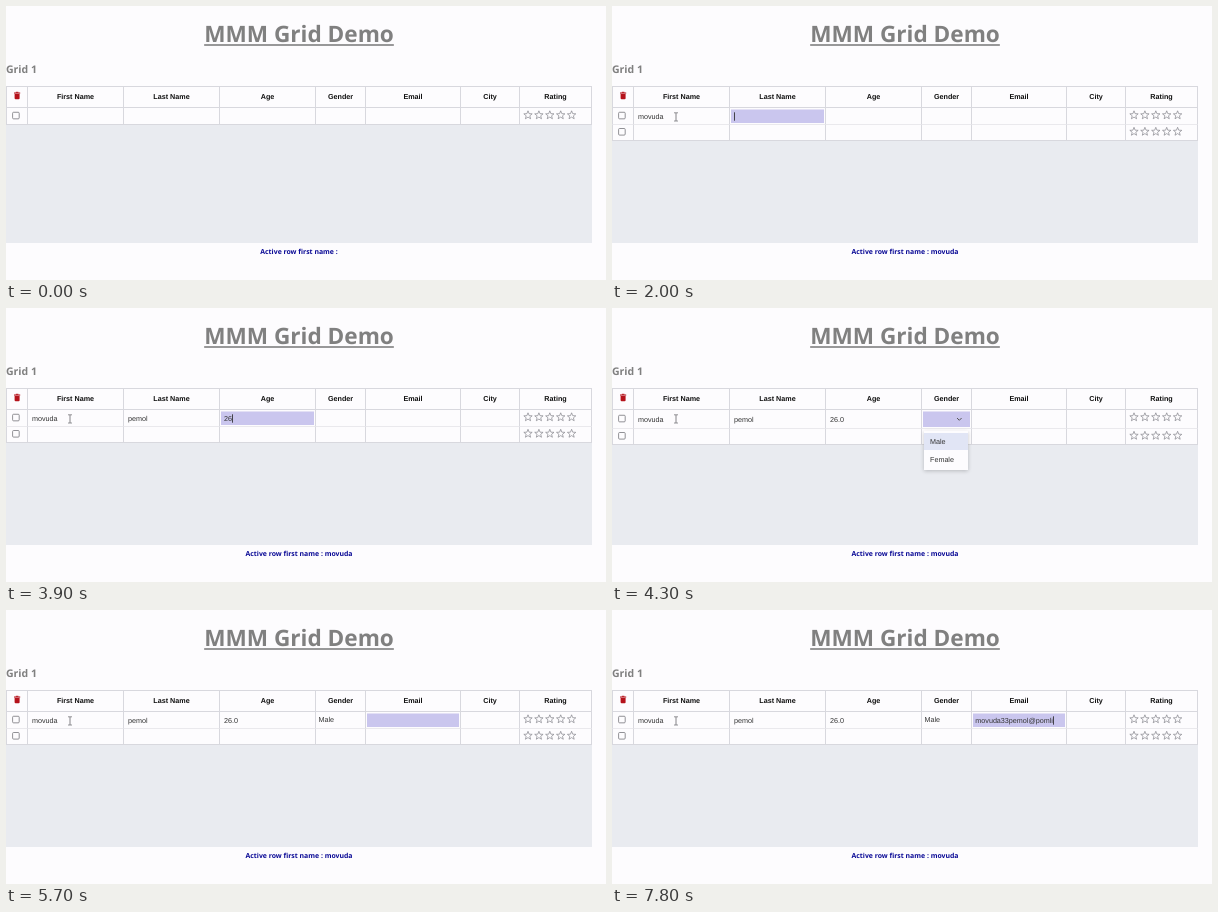
Write an HTML page with a canvas that moves like this. It is 600 px wide and 274 px high and loops after 8000 ms.

```html
<!DOCTYPE html>
<html lang="en">
<head>
<meta charset="utf-8">
<title>Grid Demo</title>
<style>
  html, body { margin: 0; height: 100%; overflow: hidden; background: #fdfcfe; }
  canvas { display: block; width: 600px; height: 274px; }
</style>
</head>
<body>
<canvas id="stage"></canvas>
<script>
const LOOP = 8000;
const SANS = '"Liberation Sans", Arial, sans-serif';
const HUMANIST = '"Open Sans", "Noto Sans", sans-serif';
const FIRST = 'movuda', LAST = 'pemol', EMAIL = 'movuda33pemol@pomli';
const COLUMNS = [0, 21.5, 117.5, 213.5, 309.5, 359.5, 454.5, 513.5, 585.5];
const HEADERS = ['', 'First Name', 'Last Name', 'Age', 'Gender', 'Email', 'City', 'Rating'];

// Each field is edited from start to end; keys holds the time of every keystroke.
const emailKeys = [...Array.from({ length: 13 }, (_, i) => 5800 + i * 100),
  7200, 7300, 7400, 7600, 7700, 7800];
const FIELDS = [
  { col: 1, typed: FIRST, start: 800, caret: 900, end: 1900, keys: [1000, 1300, 1400, 1500, 1600, 1700] },
  { col: 2, typed: LAST, start: 1900, end: 3000, keys: [2200, 2300, 2500, 2600, 2800] },
  { col: 3, typed: '26', final: '26.0', start: 3000, end: 4100, keys: [3200, 3400] },
  { col: 4, typed: 'ma', final: 'Male', start: 4100, end: 5500, keys: [4700, 4800] },
  { col: 5, typed: EMAIL, start: 5500, caret: 5800, end: LOOP, keys: emailKeys }
];
const POINTER_PATH = [[475, 238], [300, 170], [120, 125], [61, 106]];

const canvas = document.getElementById('stage');
const ctx = canvas.getContext('2d');
const scale = window.devicePixelRatio || 1;
canvas.width = 600 * scale;
canvas.height = 274 * scale;

function rect(x, y, w, h, color) {
  ctx.fillStyle = color;
  ctx.fillRect(x, y, w, h);
}

function line(points, color, width = 1) {
  ctx.strokeStyle = color;
  ctx.lineWidth = width;
  ctx.beginPath();
  points.forEach(([x, y]) => ctx.lineTo(x, y));
  ctx.stroke();
}

function text(string, x, y, { font = `7.2px ${SANS}`, color = '#333', align = 'left' } = {}) {
  ctx.font = font;
  ctx.fillStyle = color;
  ctx.textAlign = align;
  ctx.fillText(string, x, y);
  return ctx.measureText(string).width;
}

function star(cx, cy) {
  ctx.beginPath();
  for (let i = 0; i < 10; i++) {
    const angle = -Math.PI / 2 + i * Math.PI / 5;
    const radius = i % 2 ? 1.9 : 4.4;
    ctx.lineTo(cx + radius * Math.cos(angle), cy + radius * Math.sin(angle));
  }
  ctx.closePath();
  ctx.strokeStyle = '#85858b';
  ctx.lineWidth = 0.7;
  ctx.stroke();
}

function row(top, bottom) {
  rect(0, top, 586, bottom - top, '#fdfcfe');
  COLUMNS.forEach(x => line([[x + (x ? 0 : 0.5), top], [x + (x ? 0 : 0.5), bottom]], '#d8d8de'));
  line([[0, bottom], [586, bottom]], '#d8d8de');
}

function dataRow(top, bottom) {
  row(top, bottom);
  const middle = (top + bottom) / 2 - 0.8;
  ctx.strokeStyle = '#77777c';
  ctx.lineWidth = 0.8;
  ctx.beginPath();
  ctx.roundRect(6.6, middle - 3.2, 6.6, 6.6, 1);
  ctx.stroke();
  for (let i = 0; i < 5; i++) star(522 + i * 10.9, top + 7.2);
}

function trash() {
  const red = '#b5121b';
  rect(9.8, 85.8, 2.6, 1, red);
  rect(8, 86.5, 6.2, 1.1, red);
  ctx.beginPath();
  ctx.roundRect(8.6, 88, 5, 5.2, [0, 0, 1, 1]);
  ctx.fill();
}

function header() {
  const gray = '#808080';
  const width = text('MMM Grid Demo', 293, 36.3, { font: `bold 22.6px ${HUMANIST}`, color: gray, align: 'center' });
  rect(293 - width / 2, 38.2, width, 1.6, gray);
  text('Grid 1', 0, 67, { font: `bold 10.5px ${HUMANIST}`, color: gray });
  row(80.5, 101.5);
  line([[0, 80.5], [586, 80.5]], '#d8d8de');
  HEADERS.forEach((label, i) => text(label, (COLUMNS[i] + COLUMNS[i + 1]) / 2, 93.3,
    { font: `bold 7.2px ${SANS}`, color: '#111', align: 'center' }));
  trash();
}

function field(f, t, shift) {
  if (t < f.start) return;
  const left = COLUMNS[f.col];
  const isGender = f.col === 4;
  if (t >= f.end) {
    text(f.final || f.typed, left + (isGender ? 3 : 4.5), (isGender ? 112 : 112.8) + shift);
    return;
  }
  rect(left + 1.5, 103.5, COLUMNS[f.col + 1] - left - 3, isGender ? 15.5 : 13.5, '#cac6ee');
  const typed = isGender && t >= 5200 ? f.final : f.typed.slice(0, f.keys.filter(k => k <= t).length);
  const x = left + (isGender ? 8 : f.col === 5 ? 3.8 : 4.5);
  const width = text(typed, x, isGender ? 113.3 : 112.8);
  if (isGender) line([[345, 110], [347.3, 112.3], [349.6, 110]], '#555', 1);
  else if (t >= (f.caret || f.start)) rect(x + width + 0.2, 106.3, 0.8, 8.4, '#222');
}

function popup(t) {
  if (t < 4100 || t >= 5200) return;
  ctx.save();
  ctx.globalAlpha = Math.min(1, (t - 4000) / 200);
  ctx.shadowColor = 'rgba(0,0,0,.22)';
  ctx.shadowBlur = 4 * scale;
  ctx.shadowOffsetY = scale;
  rect(312, 122.5, 44, 39.5, '#fdfcfe');
  ctx.shadowColor = 'transparent';
  rect(312, 125, 44, 17, '#e1e5f5');
  text('Male', 318, 135.8);
  text('Female', 318, 153.6);
  ctx.restore();
}

function cursor(t) {
  if (t < 200) return;
  if (t >= 800) {
    const gray = '#77777c';
    line([[64, 107], [64, 115]], gray, 0.9);
    line([[62, 106.8], [66, 106.8]], gray, 0.8);
    line([[62, 115], [66, 115]], gray, 0.8);
    return;
  }
  const [x, y] = POINTER_PATH[Math.min(3, Math.floor((t - 200) / 100))];
  ctx.beginPath();
  [[0, 0], [0, 9], [2, 7.2], [3.4, 10.2], [4.7, 9.6], [3.4, 6.7], [6.2, 6.5]]
    .forEach(([dx, dy]) => ctx.lineTo(x + dx, y + dy));
  ctx.closePath();
  ctx.fillStyle = '#fff';
  ctx.fill();
  ctx.strokeStyle = '#333';
  ctx.lineWidth = 0.7;
  ctx.stroke();
}

function draw(t) {
  ctx.setTransform(scale, 0, 0, scale, 0, 0);
  ctx.textRendering = 'geometricPrecision';
  rect(0, 0, 600, 274, '#fdfcfe');
  rect(0, 80, 586, 157, '#e9ebf0');
  header();

  const named = t >= FIELDS[0].end;
  const stretch = t >= 4100 && t < 5500 ? 2 : 0;
  dataRow(102, 118.5 + stretch);
  if (named) dataRow(118.5 + stretch, 134.5 + stretch);
  FIELDS.forEach(f => field(f, t, stretch / 2));
  popup(t);

  text('Active row first name :' + (named ? ' ' + FIRST : ''), 293, 248.2,
    { font: `bold 6.9px ${HUMANIST}`, color: '#0a0a96', align: 'center' });
  cursor(t);
}

function frame() {
  const t = performance.now() % LOOP;
  draw(Math.floor(t / 100) * 100);
  requestAnimationFrame(frame);
}
frame();
</script>
</body>
</html>
```
